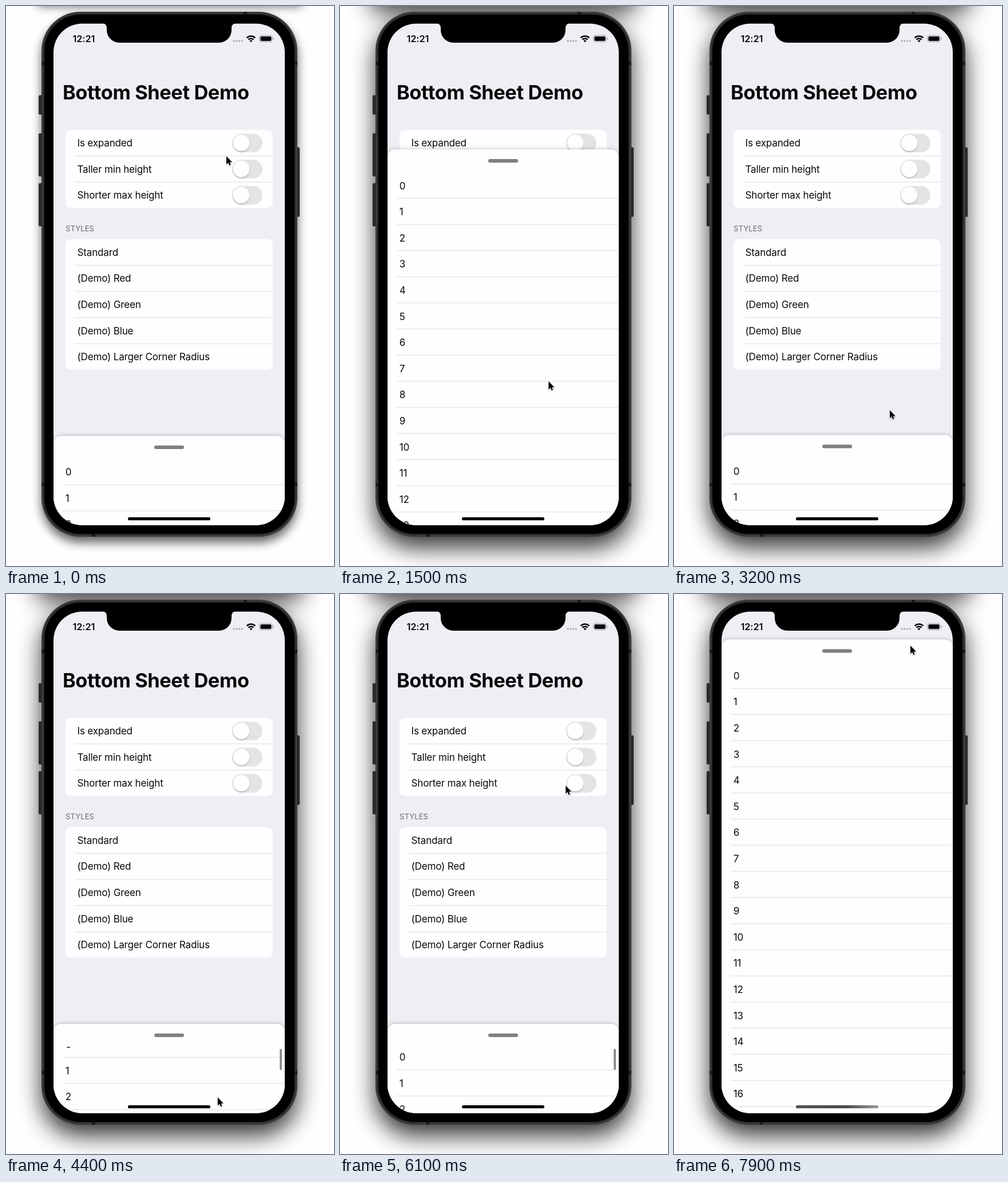
An HTML page for the animation above (8000 ms loop, 573 by 977 pixels).

```html
<!DOCTYPE html>
<html lang="en">
<head>
<meta charset="utf-8">
<title>Bottom Sheet Demo</title>
<style>
  html, body { margin: 0; width: 100%; height: 100%; overflow: hidden; background: #fefdff; }
  svg { display: block; }
  text { font-family: Inter, Roboto, sans-serif; font-optical-sizing: none; fill: #0a0a0b; }
  .row { font-size: 17.1px; letter-spacing: -.2px; }
  .title { font-size: 34.4px; font-weight: 700; letter-spacing: -.4px; }
  .head { font-size: 13.1px; letter-spacing: .08px; fill: #6d6c71; }
  .time { font-size: 16.3px; font-weight: 600; letter-spacing: -.1px; }
  .line { stroke: #dddce0; }
  .paper { fill: #fefdff; }
</style>
</head>
<body>
<svg width="573" height="977" viewBox="0 0 573 977">
  <defs>
    <filter id="blurIdle" filterUnits="userSpaceOnUse" x="-80" y="-160" width="740" height="1240"><feGaussianBlur stdDeviation="8.5"/></filter>
    <filter id="blurActive" filterUnits="userSpaceOnUse" x="-80" y="-160" width="740" height="1240"><feGaussianBlur stdDeviation="20"/></filter>
    <filter id="knobShadow" x="-30%" y="-30%" width="160%" height="170%"><feDropShadow dx="0" dy="2" stdDeviation="1.8" flood-opacity=".2"/></filter>
    <filter id="sheetShadow" filterUnits="userSpaceOnUse" x="60" y="-30" width="450" height="1000"><feDropShadow dx="0" dy="0" stdDeviation="3.5" flood-opacity=".28"/></filter>
    <filter id="arrowShadow" x="-50%" y="-50%" width="200%" height="200%"><feDropShadow dx="0" dy="1" stdDeviation="1" flood-opacity=".35"/></filter>
    <clipPath id="screenClip"><rect x="83" y="30.7" width="404" height="875" rx="50"/></clipPath>
    <clipPath id="listClip"><rect x="83" y="40" width="404" height="900"/></clipPath>
    <linearGradient id="tint"><stop offset="0" stop-color="#34c759" stop-opacity=".4"/><stop offset="1" stop-color="#34c759" stop-opacity=".05"/></linearGradient>
    <linearGradient id="homeFade"><stop offset="0" stop-color="#525154"/><stop offset=".6" stop-color="#4a494c"/><stop offset="1" stop-color="#9c9b9e"/></linearGradient>
    <g id="outline">
      <rect x="62" y="10" width="447" height="916" rx="68"/>
      <rect x="55" y="-120" width="461" height="110"/>
    </g>
  </defs>

  <rect class="paper" width="573" height="977"/>
  <g id="idle" opacity=".6"><use href="#outline" y="10" filter="url(#blurIdle)"/></g>
  <g id="active" opacity=".78"><use href="#outline" y="19" filter="url(#blurActive)"/></g>

  <g fill="#29292b" stroke="#151516" stroke-width=".6">
    <rect x="57.3" y="156" width="6" height="33" rx="1.5"/>
    <rect x="57.3" y="222.5" width="6" height="74.5" rx="1.5"/>
    <rect x="57.3" y="309.5" width="6" height="74.5" rx="1.5"/>
    <rect x="507" y="247" width="5.7" height="120.5" rx="1.5"/>
  </g>
  <rect x="62" y="10" width="447" height="916" rx="68" fill="#2d2d2f"/>
  <rect x="63.5" y="11.5" width="444" height="913" rx="66.5" fill="none" stroke="#505052"/>
  <g fill="#1b1b1c">
    <path d="M62 97h447v6H62zM62 832h447v6H62z"/>
    <path d="M150 920h6v6h-6zM415 10h6v6h-6z"/>
  </g>
  <rect x="67" y="15" width="437" height="906" rx="63"/>

  <g clip-path="url(#screenClip)">
    <rect x="83" y="30" width="404" height="877" fill="#efeef4"/>
    <text class="title" x="99" y="163">Bottom Sheet Demo</text>
    <g id="form"></g>
    <text class="head" x="104" y="393">STYLES</text>

    <g id="sheet">
      <rect class="paper" x="83" y="0" width="404" height="940" rx="14" filter="url(#sheetShadow)"/>
      <rect x="259" y="16.7" width="52" height="6.3" rx="3.15" fill="#7f7e81"/>
      <g clip-path="url(#listClip)"><g id="list"></g></g>
      <rect id="bar" x="478.3" y="43.5" width="3.6" height="37" rx="1.8" fill="#858488"/>
    </g>

    <text class="time" x="116.5" y="62.8">12:21</text>
    <path d="M398 61h15" stroke="#b4b3b9" stroke-width="3.6" stroke-linecap="round" stroke-dasharray="0 4.7"/>
    <g fill="none" stroke="#060606" stroke-width="2.5">
      <path d="M420.6 55.5a10.6 10.6 0 0 1 14.8 0M423.4 58.6a6.6 6.6 0 0 1 9.2 0"/>
      <path d="M425.5 60.7a3.6 3.6 0 0 1 5 0L428 63.2Z" fill="#060606" stroke="none"/>
    </g>
    <rect x="442.7" y="51.2" width="22.6" height="11.4" rx="3.5" fill="none" stroke="#9c9ba1"/>
    <rect x="444.4" y="52.9" width="19.2" height="8" rx="2" fill="#060606"/>
    <path d="M466.6 55v4q1.5-.7 1.5-2t-1.5-2" fill="#9c9ba1"/>
    <rect id="home" x="213" y="892" width="144" height="5.3" rx="2.65"/>
  </g>
  <path d="M168 30A8 8 0 0 1 176 38V42A22 22 0 0 0 198 64H372A22 22 0 0 0 394 42V38A8 8 0 0 1 402 30Z"/>

  <path id="arrow" d="M0 0V14.2L3.2 11.2L5.3 16L7.6 15L5.6 10.4H10Z" stroke="#fff" stroke-width="1.1" paint-order="stroke" filter="url(#arrowShadow)"/>
</svg>
<script>
const $ = id => document.getElementById(id);
const LOOP = 8000, FRAME = 100, PITCH = 45.6;

const label = (x, mid, s) => `<text class="row" x="${x}" y="${mid + 6.2}">${s}</text>`;
const rule = (x1, x2, y) => `<path class="line" d="M${x1} ${y}H${x2}"/>`;

function card(top, labels) {
  return `<rect class="paper" x="104" y="${top}" width="362" height="${labels.length * PITCH - .5}" rx="9"/>` +
    labels.map((s, i) => label(124.5, top + 22.8 + i * PITCH, s) +
      (i ? rule(120, 466, top + i * PITCH) : '')).join('');
}

function toggle(y, id) {
  const track = `x="395" y="${y - 16}" width="53" height="32.5" rx="16.2"`;
  return `<rect ${track} fill="#e4e3e6"/><rect id="${id}Tint" ${track} fill="url(#tint)" opacity="0"/>` +
    `<circle id="${id}" class="paper" cx="411" cy="${y}" r="14.2" filter="url(#knobShadow)"/>`;
}

$('form').innerHTML =
  card(215.9, ['Is expanded', 'Taller min height', 'Shorter max height']) +
  card(406.8, ['Standard', '(Demo) Red', '(Demo) Green', '(Demo) Blue', '(Demo) Larger Corner Radius']) +
  ['expand', 'taller', 'shorter'].map((id, i) => toggle(238.7 + i * PITCH, id)).join('');

$('list').innerHTML = Array.from({ length: 24 }, (_, i) =>
  label(103.8, 63 + i * PITCH, i) + rule(99, 487, 85.2 + i * PITCH)).join('');

// Smooth step from 0 to 1 between two times
function ease(t, from, to) {
  const p = Math.min(1, Math.max(0, (t - from) / (to - from)));
  return p * p * (3 - 2 * p);
}

// Critically damped spring from 0 to 1
function spring(t, from, tau) {
  const u = Math.max(0, (t - from) / tau);
  return 1 - (1 + u) * Math.exp(-u);
}

// Pointer strokes: start, end, destination
const strokes = [
  [0, 300, 390, 878],
  [400, 1000, 329, 775],
  [1200, 1900, 419, 469.5],
  [2400, 3000, 377, 705],
  [3500, 4100, 370, 882],
  [4200, 5200, 369, 846],
  [5300, 5700, 371, 898],
  [5700, 6200, 397, 269],
  [6400, 6600, 426, 247],
  [7300, 7600, 419, 119],
  [7700, 7900, 413, 90]
];

const pointer = t => strokes.reduce(([x, y], [from, to, nx, ny]) => {
  const p = ease(t, from, to);
  return [x + (nx - x) * p, y + (ny - y) * p];
}, [385, 262]);

const set = (id, name, value) => $(id).setAttribute(name, value);
const move = (id, x, y) => set(id, 'transform', `translate(${x} ${y})`);
const show = (id, on) => set(id, 'visibility', on ? 'visible' : 'hidden');

function draw(t) {
  const raised = spring(t, 1300, 75) - spring(t, 2400, 95) + spring(t, 6700, 48);
  const scrolled = ease(t, 4100, 5200) - ease(t, 5300, 6200);
  const expanded = spring(t, 6700, 80);
  const focused = t >= 1200;

  move('arrow', ...pointer(t));
  move('sheet', 0, 750 - 670.5 * raised);
  move('list', 0, -147.8 * scrolled);
  set('bar', 'opacity', ease(t, 4100, 4300) - ease(t, 7300, 7500));
  set('expand', 'cx', 411 + 21 * expanded);
  set('expandTint', 'opacity', expanded);
  set('home', 'fill', expanded ? 'url(#homeFade)' : '#000');
  show('idle', !focused);
  show('active', focused);
}

const start = performance.now();
function tick() {
  const t = (performance.now() - start) % LOOP;
  draw(Math.floor(t / FRAME) * FRAME);
  requestAnimationFrame(tick);
}
tick();
</script>
</body>
</html>
```
